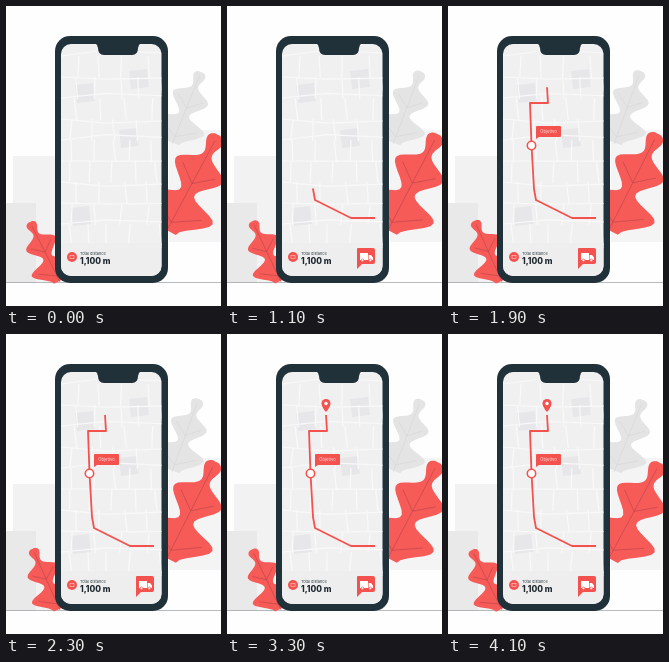
Animation, 215 px wide and 300 px high, one loop 4200 ms. Source, as an HTML page:

```html
<!DOCTYPE html>
<html lang="en">
<head>
<meta charset="utf-8">
<title>Delivery route</title>
<style>
  html, body { margin: 0; height: 100%; overflow: hidden; background: #fefefe; }
  svg { display: block; width: 215px; height: 300px; }
  text { font-family: Inter, "Open Sans", sans-serif; }
  .red { fill: #f3524f; }
</style>
</head>
<body>
<svg viewBox="0 0 215 300">
  <defs>
    <clipPath id="screen"><rect x="55" y="38" width="100.5" height="232" rx="10"/></clipPath>
  </defs>

  <g id="skyline">
    <rect x="163" y="124" width="52" height="112" fill="#f4f4f4"/>
    <rect x="7" y="150" width="43" height="127" fill="#f2f2f2"/>
    <rect y="197" width="30" height="80" fill="#e9e9e9"/>
  </g>
  <path stroke="#9aa0a3" stroke-width=".7" d="M0 276.500H215"/>

  <g id="greyLeaf"></g>
  <g id="rightLeaf"></g>
  <g id="leftLeaf"></g>

  <rect x="49" y="30" width="113" height="247" rx="15" fill="#20313a"/>
  <g clip-path="url(#screen)">
    <rect x="55" y="38" width="101" height="232" fill="#f0f0f1"/>
    <g id="blocks" fill="#e7e7e9"></g>
    <path id="roads" fill="none" stroke="#f9f9f9" stroke-width="1.200"/>
    <rect x="55" y="237" width="101" height="33" fill="#eeeeef"/>
  </g>
  <path fill="#20313a" d="M89 37H135Q132 39 132 42Q132 49 126 49H98Q92 49 92 42Q92 39 89 37Z"/>

  <path id="route" pathLength="1" stroke-dasharray="1 2" fill="none" stroke="#f3524f" stroke-width="1.800"
    stroke-linejoin="round" d="M148 212H124L88 194L86 183L83.500 139L82 97H100L99 81"/>
  <circle id="stop" cx="83.500" cy="139.500" r="4.200" fill="#fff" stroke="#f3524f" stroke-width="1.600"/>
  <g id="label">
    <path class="red" d="M89 120H112Q113 120 113 121V130Q113 131 112 131H91L88 133V121Q88 120 89 120Z"/>
    <text x="100.500" y="127" font-size="4.200" fill="#ffe4e4" text-anchor="middle">Objetivo</text>
  </g>
  <g id="pin">
    <path class="red" d="M99 78Q94.500 73 94.500 69.500A4.500 4.500 0 0 1 103.500 69.500Q103.500 73 99 78Z"/>
    <circle cx="99" cy="69.500" r="1.700" fill="#fff"/>
  </g>

  <circle class="red" cx="66" cy="251" r="5"/>
  <rect x="64" y="249.500" width="4" height="3" fill="none" stroke="#ffc9c9" stroke-width=".6"/>
  <text x="74" y="248.500" font-size="3.900" fill="#333e44">Total distance</text>
  <text x="74" y="257.500" font-size="8.300" font-weight="800" fill="#1d272d">1,100 m</text>

  <g id="truck">
    <path class="red" d="M131 242H146Q148 242 148 244V256Q148 258 146 258H135L130 263V243Q130 242 131 242Z"/>
    <path fill="#fff" d="M133 247H141V254H133ZM141.600 249H144L146 251.500V254H141.600Z"/>
    <g fill="#fff" stroke="#f3524f" stroke-width=".7">
      <circle cx="135.500" cy="254.300" r="1.300"/><circle cx="143.300" cy="254.300" r="1.300"/>
    </g>
  </g>
</svg>
<script>
const LOOP = 4200;
const $ = id => document.getElementById(id);

// Lobed leaf: the half-width ripples along the spine and shrinks towards the tip.
function leaf(id, [bx, by], [tx, ty], color, veinColor) {
  const dx = tx - bx, dy = ty - by, steps = 48;
  const width = u => 0.38 * Math.sqrt(1 - u) * (0.62 - 0.38 * Math.cos(5 * Math.PI * u));
  const edge = (u, side, reach = 1) => {
    const w = width(u) * reach, along = u + 0.2 * w;
    return [bx + dx * along - side * dy * w, by + dy * along + side * dx * w];
  };
  const half = side => Array.from({ length: steps + 1 }, (_, i) => edge(Math.sin(Math.PI / 2 * i / steps), side));
  const outline = [...half(1), ...half(-1).reverse()].join('L');
  let veins = `M${bx} ${by}L${edge(0.94, 1, 0)}`;
  for (const lobe of [0.2, 0.6])
    for (const side of [1, -1]) veins += `M${edge(lobe - 0.1, side, 0)}L${edge(lobe, side, 0.7)}`;
  $(id).innerHTML = `<path d="M${outline}Z" fill="${color}"/>
    <path d="${veins}" fill="none" stroke="${veinColor}" stroke-width=".6"/>`;
}

const leaves = [
  { id: 'greyLeaf', base: [166, 138], tip: [195, 66], fill: '#e4e4e4', vein: '#d6d6d6', swing: -2 },
  { id: 'rightLeaf', base: [160, 226], tip: [212, 129], fill: '#f65b58', vein: '#b8444a', swing: -1.5 },
  { id: 'leftLeaf', base: [54, 276], tip: [24, 216], fill: '#f65b58', vein: '#b8444a', swing: 2.5 },
];
for (const l of leaves) leaf(l.id, l.base, l.tip, l.fill, l.vein);

// Street map: gently tilted streets joined by short side roads.
let seed = 7;
const random = () => (seed = seed * 16807 % 2147483647) / 2147483647;
let roads = '';
for (let y = 50; y < 240; y += 21) {
  const tilt = random() * 12 - 6;
  roads += `M55 ${y}L100 ${y + tilt}L156 ${y + tilt / 2}`;
  for (let x = 62 + random() * 12; x < 156; x += 16 + random() * 14)
    roads += `M${x} ${y}l${random() * 6 - 3} 22`;
}
$('roads').setAttribute('d', roads);
for (const [x, y] of [[79, 87], [133, 73], [123, 132], [75, 210]])
  $('blocks').innerHTML += `<rect x="${x - 9}" y="${y - 9}" width="18" height="18" transform="rotate(-6 ${x} ${y})"/>`;

const progress = (t, from, to) => Math.min(1, Math.max(0, (t - from) / (to - from)));
const easeSine = u => (1 - Math.cos(Math.PI * u)) / 2;
const easeBack = u => 1 + 2.9 * (u - 1) ** 3 + 1.9 * (u - 1) ** 2;

function pop(id, scale, x, y) {
  $(id).setAttribute('transform', `translate(${x} ${y}) scale(${Math.max(0, scale)}) translate(${-x} ${-y})`);
}

function draw(now) {
  const t = now % LOOP;
  const wind = easeSine(2 * t / LOOP);
  for (const { id, base, swing } of leaves)
    $(id).setAttribute('transform', `rotate(${swing * wind} ${base})`);

  pop('truck', easeBack(progress(t, 100, 500)), 130, 263);
  const drawn = easeSine(progress(t, 480, 1930));
  $('route').setAttribute('stroke-dashoffset', 1 - drawn);
  $('route').style.visibility = drawn > 0 ? 'visible' : 'hidden';
  pop('stop', easeSine(progress(t, 1250, 1650)), 83.5, 139.5);
  pop('label', easeSine(progress(t, 1300, 1700)), 90, 134);
  pop('pin', easeBack(progress(t, 2400, 2900)), 99, 78);
  requestAnimationFrame(draw);
}
requestAnimationFrame(draw);
</script>
</body>
</html>
```
